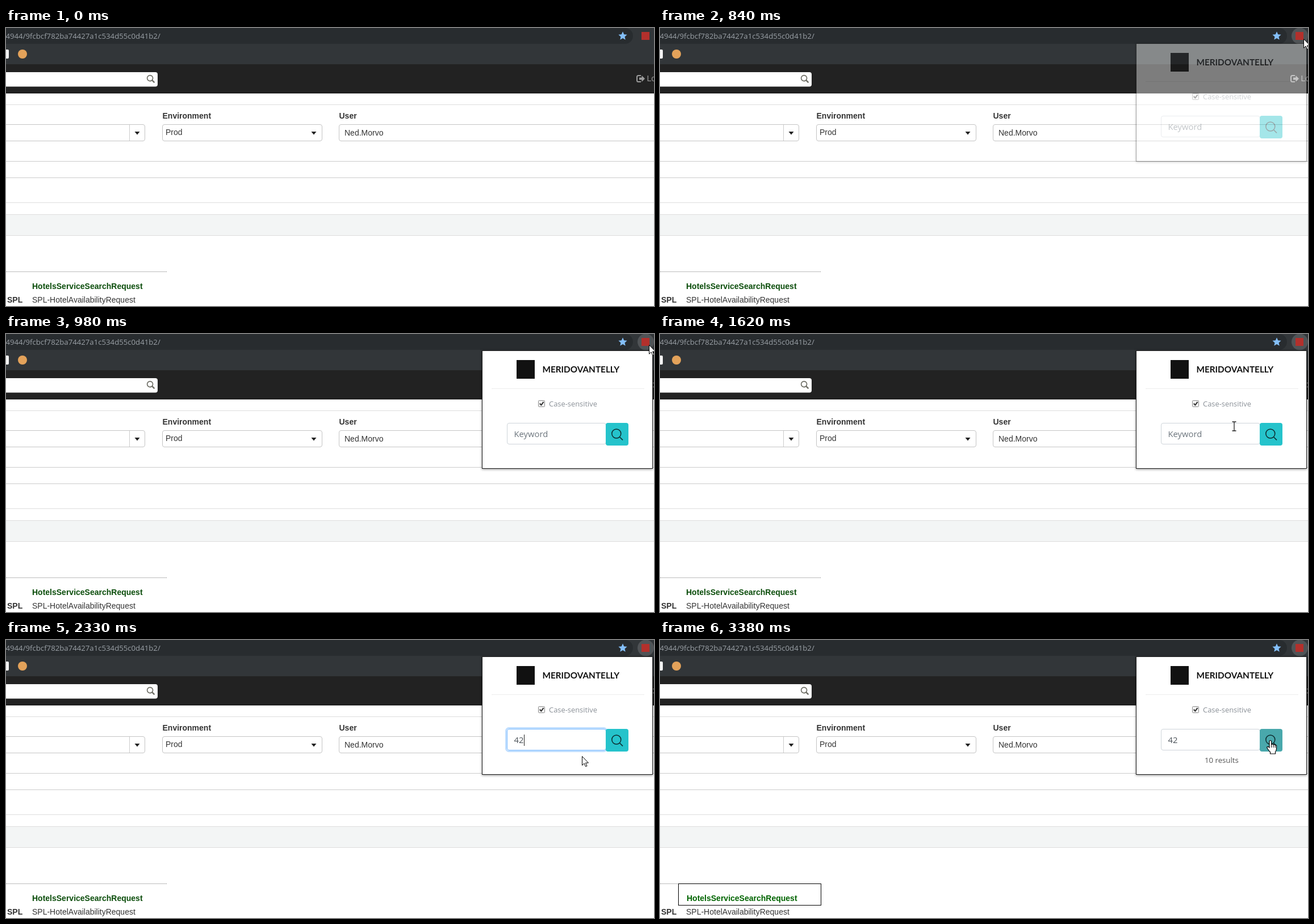
Animation, 1141 px wide and 491 px high, one loop 4.9 s. Source, as an HTML page:

```html
<!DOCTYPE html>
<html lang="en">
<head>
<meta charset="utf-8">
<title>Keyword search</title>
<style>
  html, body { margin: 0; width: 100%; height: 100%; overflow: hidden; background: #fff; }
  svg { display: block; }
  text { font: 14px "Liberation Sans", Arial, sans-serif; fill: #333; white-space: pre; }
  .bold { font-weight: bold; }
  .ui { font-family: "Open Sans", "Noto Sans", sans-serif; }
  .box { fill: #fff; stroke: #c4c4c4; }
  .rule { fill: none; stroke: #ccc; }
  .soft { stroke: #ddd; }
  #popup { filter: drop-shadow(0 1px 2px rgba(0, 0, 0, .45)); }
</style>
</head>
<body>
<svg width="1141" height="491" viewBox="0 0 1141 491">
  <!-- browser bars -->
  <path fill="#323639" d="M0 0H1141V64H0z"/>
  <path fill="#282c2f" d="M0 0H1090A14 14 0 0 1 1090 28H0z"/>
  <text class="ui" x="-.5" y="19" style="font-size:13.2px;fill:#9aa0a6">4944/9fcbcf782ba74427a1c534d55c0d41b2/</text>
  <path fill="#84bffa" d="M1086 6.3l2.2 5 5.4.5-4.1 3.6 1.2 5.3-4.7-2.8-4.7 2.8 1.2-5.3-4.1-3.6 5.4-.5z"/>
  <circle id="hover" cx="1126.5" cy="14" r="14.5" fill="#505457"/>
  <rect x="1119" y="7" width="14" height="14" fill="#b3302c"/>
  <rect x="-4" y="38" width="9" height="16" rx="2" fill="#f4f4f4"/>
  <circle cx="29" cy="46" r="8" fill="#e3a25a"/>

  <!-- site header -->
  <path fill="#222" d="M0 64H1141V115H0z"/>
  <path fill="#080808" d="M0 114H1141V115.5H0z"/>
  <rect x="-6" y="78" width="273" height="25.5" rx="4" fill="#fff"/>
  <g fill="none" stroke="#6b6b62" stroke-width="1.6">
    <circle cx="253.6" cy="88.6" r="5"/>
    <path stroke-width="2.2" d="M257.4 92.4l4 4"/>
  </g>
  <path fill="none" stroke="#9d9d9d" stroke-width="2" d="M1118 84h-4.500q-2.500 0-2.500 2.500v6q0 2.500 2.500 2.500h4.500"/>
  <path fill="#9d9d9d" d="M1115 87.500h4.500v-3.500l5.500 5.500-5.500 5.500v-3.500h-4.500z"/>
  <text x="1128.500" y="94" style="fill:#9d9d9d">Log out</text>

  <!-- form -->
  <path class="rule soft" d="M0 135.500H1141M0 308.500H1141"/>
  <path class="rule" d="M0 235.500H1141M0 264.500H1141"/>
  <text class="bold" x="275.500" y="160">Environment</text>
  <text class="bold" x="586.500" y="160">User</text>
  <rect class="box" x="-9.500" y="170.500" width="254" height="29" rx="3.500"/>
  <path class="rule" d="M217.500 171V199"/>
  <rect class="box" x="275.500" y="170.500" width="281" height="29" rx="3.500"/>
  <rect class="box" x="586.500" y="170.500" width="600" height="29" rx="3.500"/>
  <path fill="#222" d="M226.500 183h9l-4.500 5.500zM537.500 183h9l-4.500 5.500z"/>
  <text x="281" y="189">Prod</text>
  <text x="596" y="190">Ned.Morvo</text>
  <path fill="#f3f5f5" d="M0 329H1141V367H0z"/>
  <path class="rule soft" d="M0 329.500H1141M0 366.500H1141"/>

  <!-- request list -->
  <path stroke="#777" stroke-dasharray="1 1" d="M0 430.500H283"/>
  <rect id="mark" x="32.500" y="430.500" width="251" height="38" fill="#fff" stroke="#000"/>
  <text id="request" class="bold" y="461">HotelsServiceSearchRequest</text>
  <text class="bold" x="2" y="485">SPL</text>
  <text x="46" y="485">SPL-HotelAvailabilityRequest</text>

  <!-- extension popup -->
  <g id="popup">
    <rect x="838.500" y="29.500" width="300" height="208" fill="#fff" stroke="#1c1c1c"/>
    <rect x="899" y="46" width="32" height="33" fill="#111"/>
    <text x="944.500" y="68" style="font:bold 15.300px Lato,sans-serif;fill:#111">MERIDOVANTELLY</text>
    <path stroke="#ececec" d="M855 96.500H1124"/>
    <rect x="937.500" y="117.500" width="11" height="11" rx="1" fill="#f3f3f3" stroke="#8c8c8c"/>
    <path fill="none" stroke="#333" stroke-width="2" d="M939.800 122.800l2.600 2.700 4.200-5.700"/>
    <text class="ui" x="956" y="128" style="font-size:12.900px;fill:#8b9198">Case-sensitive</text>
    <rect id="ring" x="880.500" y="155.500" width="177" height="41" rx="5" fill="none" stroke="#bfdeff" stroke-width="3"/>
    <rect id="field" x="882.500" y="157.500" width="174" height="37" rx="3.500" fill="#fff"/>
    <text id="entry" class="ui" x="894.500" y="182" style="font-size:14.800px"></text>
    <path id="caret" stroke="#222" d="M0 167V187"/>
    <rect id="button" x="1056" y="157" width="40" height="40" rx="4"/>
    <g fill="none" stroke="#0d2a2d" stroke-width="1.500">
      <circle cx="1074.800" cy="176" r="8"/>
      <path d="M1080.600 182l5.400 5.400"/>
    </g>
    <text id="results" class="ui" x="959" y="217" style="font-size:13.200px;fill:#555">10 results</text>
  </g>

  <!-- pointers -->
  <g id="pointer" stroke="#000" fill="#fff">
    <path id="arrow" d="M.5.500V16.300L4.100 12.900L6.600 18.500L9 17.500L6.600 12H11.500z"/>
    <path id="beam" fill="none" stroke="#222" stroke-width="1.300" d="M-3.500-8h2.500q1 0 1 1q0-1 1-1h2.500M0-7V7M-3.500 8h2.500q1 0 1-1q0 1 1 1h2.500"/>
    <g id="hand">
      <path stroke-width="1.200" d="M-2 12V1.500Q-2-.500-.200-.500T1.600 1.500V7Q1.800 5.600 3.400 5.800T5 7.500Q5.400 6.300 6.900 6.600T8.200 8.200Q8.700 7.400 9.700 7.800T10.500 9.500V14Q10.500 17 8.500 19.500V23H-.500V20Q-3 17.500-5.500 13.500Q-6.800 11.500-5.600 10.600T-3 11.200z"/>
      <path d="M1.600 7v5M5 7.500v4.500M8.200 8.200v4" stroke-width="1"/>
    </g>
  </g>
</svg>
<script>
const LOOP = 4900;
const $ = id => document.getElementById(id);
const set = (id, attrs) => {
  for (const k in attrs) $(id).setAttribute(k, attrs[k]);
};
const show = (id, on) => set(id, { visibility: on ? 'inherit' : 'hidden' });

// time, x, y
const PATH = [
  [410, 1139, 62], [700, 1133, 18], [1210, 1132, 20],
  [1320, 1112, 48], [1480, 1048, 122], [1620, 1011, 163], [1660, 1011, 163],
  [1720, 1005, 177], [1960, 1005, 177], [2120, 1010, 192], [2290, 1014, 203],
  [2330, 1014, 205], [2450, 1014, 205], [2600, 1037, 200],
  [2740, 1066, 185], [2840, 1075, 178]
];
// time, opacity, vertical offset
const FADE = [[0, 0, -3], [790, .12, -3], [840, .41, -2], [890, .74, -1], [930, .93, -1], [980, 1, 0]];
// time, focus ring strength
const FOCUS = [[0, 0], [1770, .4], [1820, .75], [1870, 1], [3300, .65], [3340, .3], [3380, 0]];
// time, typed text
const TYPED = [[0, ''], [2120, '4'], [2330, '42']];

const held = (table, t) => table.filter(row => row[0] <= t).pop();

function along(path, t) {
  const i = path.findIndex(p => p[0] > t);
  if (i < 0) return path[path.length - 1].slice(1);
  if (i === 0) return path[0].slice(1);
  const [t0, x0, y0] = path[i - 1], [t1, x1, y1] = path[i];
  const k = (t - t0) / (t1 - t0);
  return [x0 + (x1 - x0) * k, y0 + (y1 - y0) * k];
}

const inside = (x, y, l, t, r, b) => x >= l && x < r && y >= t && y < b;

function draw(t) {
  const [x, y] = along(PATH, t).map(Math.round);
  const open = t >= 790;
  const onButton = open && inside(x, y, 1056, 157, 1096, 197);
  const onField = open && inside(x, y, 882, 157, 1056, 195);
  show('pointer', t >= 410);
  set('pointer', { transform: `translate(${x} ${y})` });
  show('hand', t >= 410 && onButton);
  show('beam', t >= 410 && onField);
  show('arrow', t >= 410 && !onButton && !onField);
  show('hover', t >= 560);

  const [, alpha, dy] = held(FADE, t);
  set('popup', { opacity: alpha, transform: `translate(0 ${dy})` });

  const focus = held(FOCUS, t)[1];
  set('ring', { opacity: focus });
  set('field', { stroke: focus > .5 ? '#80bdff' : focus ? '#a8c9ec' : '#ced4da' });

  const typed = held(TYPED, t)[1];
  $('entry').textContent = typed || 'Keyword';
  $('entry').style.fill = typed ? '#495057' : '#6c757d';
  show('caret', t >= 1770 && t < 2870);
  set('caret', { transform: `translate(${[895.5, 903.5, 912.5][typed.length]} 0)` });
  set('button', { fill: onButton ? '#49a8ac' : '#25c3cb' });

  const found = t >= 3300;
  show('results', found);
  show('mark', found);
  set('request', { x: found ? 47 : 46 });
  $('request').style.fill = found ? '#006400' : '#0b4d0b';
}

const start = performance.now();
function tick() {
  draw((performance.now() - start) % LOOP);
  requestAnimationFrame(tick);
}
tick();
</script>
</body>
</html>
```
